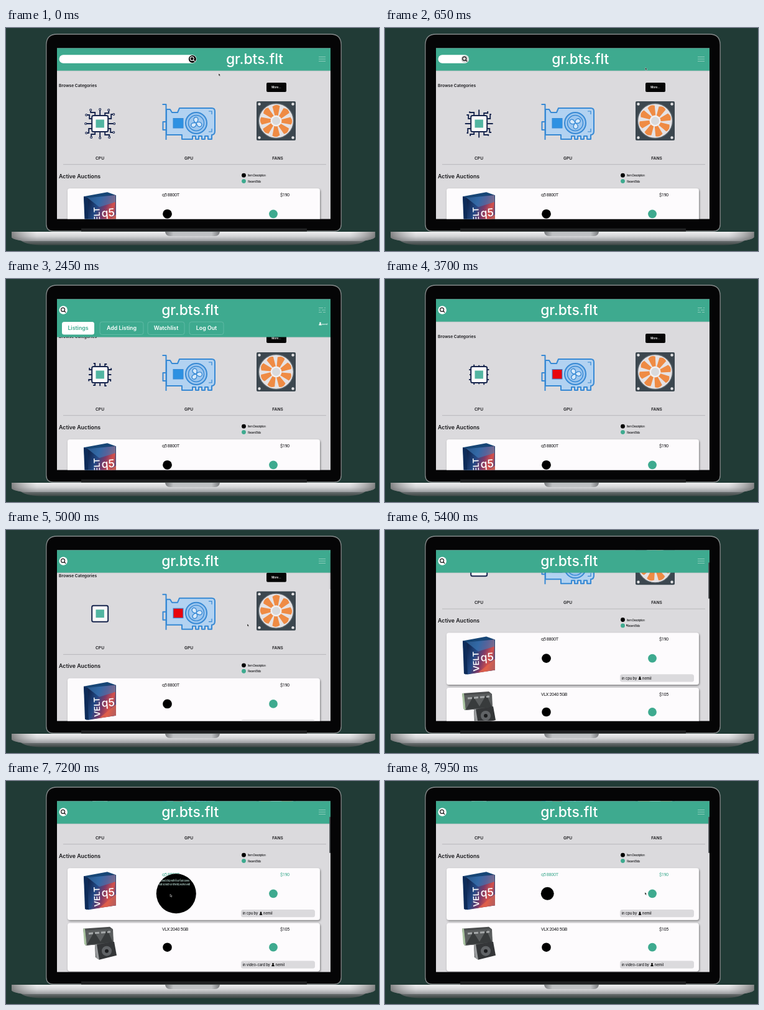
These frames come from a looping animation (600 by 359 pixels, 8 s). An HTML page:

```html
<!DOCTYPE html>
<html lang="en">
<head>
<meta charset="utf-8">
<title>Parts auction on a laptop</title>
<style>
html, body { margin: 0; width: 100%; height: 100%; overflow: hidden; background: #213b36; }
svg { display: block; width: 100%; height: 100%; }
text { font-family: Inter, "Open Sans", sans-serif; font-weight: 600; fill: #17171a; }
.mid { text-anchor: middle; }
.slim text { font-family: Roboto, "Open Sans", sans-serif; font-weight: 400; font-stretch: 75%; letter-spacing: -.45px; }
.leg { fill: none; stroke: #17254d; stroke-width: 1.9; }
.line { fill: none; stroke: #3789d4; stroke-width: 2; stroke-linejoin: round; }
.tab { fill: none; stroke: #6fc2af; stroke-width: .7; }
</style>
</head>
<body>
<svg viewBox="0 0 600 359" preserveAspectRatio="none">
<defs>
  <linearGradient id="metal" x2="0" y2="1">
    <stop offset="0" stop-color="#f0f0f1"/><stop offset=".5" stop-color="#d2d3d5"/><stop offset="1" stop-color="#9a9c9f"/>
  </linearGradient>
  <linearGradient id="under" x2="0" y2="1">
    <stop offset="0" stop-color="#85878a"/><stop offset="1" stop-color="#3c4644"/>
  </linearGradient>
  <linearGradient id="sides">
    <stop offset="0" stop-color="#444" stop-opacity=".6"/><stop offset=".07" stop-color="#888" stop-opacity="0"/>
    <stop offset=".93" stop-color="#888" stop-opacity="0"/><stop offset="1" stop-color="#444" stop-opacity=".6"/>
  </linearGradient>
  <linearGradient id="notch">
    <stop offset="0" stop-color="#77797c"/><stop offset=".15" stop-color="#bfc1c3"/>
    <stop offset=".85" stop-color="#bfc1c3"/><stop offset="1" stop-color="#77797c"/>
  </linearGradient>
  <linearGradient id="boxArt" x1="0" y1=".3" x2="1" y2=".7">
    <stop offset="0" stop-color="#10264f"/><stop offset=".3" stop-color="#234a86"/>
    <stop offset=".55" stop-color="#7d3a68"/><stop offset=".78" stop-color="#d5504a"/><stop offset="1" stop-color="#3b4a92"/>
  </linearGradient>
  <filter id="soft" x="-5%" y="-10%" width="110%" height="125%">
    <feDropShadow dx="1" dy="1.5" stdDeviation="1.5" flood-color="#000" flood-opacity=".45"/>
  </filter>
  <clipPath id="screen"><rect x="82" y="32.6" width="440" height="274.8"/></clipPath>
  <clipPath id="spotClip"><circle id="spotHole" cy="299.3"/></clipPath>
  <g id="legSide">
    <path class="leg" pathLength="1" d="M-8-13v-5h-7v-4"/>
    <path class="leg" pathLength="1" d="M0-13v-11"/>
    <path class="leg" pathLength="1" d="M8-13v-4h6v-5"/>
  </g>
</defs>

<rect width="600" height="359" fill="#213b36"/>
<path d="M64.8 316V27Q65 10 82 10H522Q539 10 539.2 27V316Q539 327 528 327H76Q65 327 64.8 316Z" fill="#050506" stroke="#85898a" stroke-width="1.3"/>
<rect x="121" y="322.5" width="363" height="5" fill="#1f2021"/>

<g clip-path="url(#screen)">
  <rect x="82" y="32" width="440" height="276" fill="#dbdadd"/>
  <g id="page">
    <text x="85" y="95.4" font-size="6.7">Browse Categories</text>
    <rect x="419" y="88" width="32" height="15" rx="2" fill="#050505"/>
    <text class="mid" x="435" y="97.2" font-size="4.5" style="fill:#fff">More...</text>

    <g transform="translate(151.2 154)">
      <g id="legs"></g>
      <rect x="-13" y="-13" width="26" height="26" rx="2.5" fill="#fafafa" stroke="#17254d" stroke-width="2"/>
      <rect x="-6.7" y="-6.5" width="13.4" height="13" fill="#52b5a1"/>
    </g>

    <g>
      <path class="line" d="M251.5 123H257.5V180M257.5 151H252.5V164H257.5"/>
      <path class="line" style="fill:#b2d2f1" d="M258 131H264L267 136H276L279 129H331Q336 129 336 134V166Q336 172 331 172V179H325V174H320V179H315V174H310V179H305V174H300V179H283V172H258Z"/>
      <rect id="core" x="269" y="145.5" width="16" height="15.5" stroke="#3789d4"/>
      <circle class="line" cx="306" cy="153" r="17" style="fill:#9cc6ef"/>
      <circle class="line" cx="306" cy="153" r="12.5" style="stroke-width:1.4"/>
      <g id="prop" fill="#d7e9fa" stroke="#3789d4" stroke-width="1.3"></g>
      <path class="line" style="stroke-width:1.2" d="M326 134h5v5M326 167h5v-5"/>
    </g>

    <g transform="translate(434.5 149.5)">
      <rect x="-31.5" y="-31.5" width="63" height="63" rx="2" fill="#3c474f"/>
      <g id="screws" fill="#e3e3e5"></g>
      <circle r="28" fill="#e5e2e4" stroke="#5b666d" stroke-width="1.3"/>
      <g id="blades" fill="#ef8b44"></g>
      <circle r="9" fill="#f2f0f1"/><circle r="6.5" fill="#d9dadd"/>
    </g>

    <g class="mid" font-size="6.6">
      <text x="151" y="211.5">CPU</text><text x="294" y="211.5">GPU</text><text x="437" y="211.5">FANS</text>
    </g>
    <path d="M92 219.7H515" stroke="#b0afb3" stroke-width=".8"/>
    <text x="85" y="241.7" font-size="8.8">Active Auctions</text>
    <circle cx="382.5" cy="237.2" r="3.4"/><circle cx="382.5" cy="246.6" r="3.4" fill="#3eaa8f"/>
    <g class="slim" font-size="4.9"><text x="389" y="239.2">Item Description</text><text x="389" y="248.6">Recent Bids</text></g>

    <g id="cards"></g>

    <g transform="translate(0 258.2)">
      <path d="M125 13 163 6 177 11 177 60 129 67Z" fill="#174676"/>
      <path d="M125 13 131 15 133 67 127 66Z" fill="#0d2b59"/>
      <path d="M131 15 176 11 177 60 133 67Z" fill="url(#boxArt)"/>
      <path d="M131 15 176 11 176 22 150 30Z" fill="#3f7fbd" opacity=".6"/>
      <path d="M150 64 177 42V60Z" fill="#e5654a" opacity=".75"/>
      <text transform="translate(151.5 62) rotate(-92)" font-size="13" style="fill:#fff">VELT</text>
      <text transform="translate(154 46) rotate(-4)" font-size="17.5" style="fill:#fff;font-weight:500">q5</text>
    </g>
    <g transform="translate(0 346.7)">
      <path d="M124 9 167 6 172 10 173 32 128 36Z" fill="#4a4c4d"/>
      <path d="M124 9 127 9 130 36 126 34Z" fill="#a9c3a0"/>
      <path d="M128 12 171 9 173 32 130 36Z" fill="#5a5d5e"/>
      <path d="M130 35 142 14 152 30 163 11 172 31Z" fill="#383b3c"/>
      <path d="M133 17 168 14" stroke="#a5a8a9" stroke-width="3" stroke-dasharray="7 3"/>
      <path d="M143 35 174 30 178 52 150 59 144 55Z" fill="#343638"/>
      <path d="M143 35 146 34 150 59 145 56Z" fill="#9b9d9f"/>
      <circle cx="162" cy="45" r="8" fill="#606366"/><circle cx="162" cy="45" r="3" fill="#1b1c1e"/>
    </g>

    <circle id="spot" cy="299.3"/>
    <g id="note" class="slim" clip-path="url(#spotClip)" font-size="4.5">
      <text x="242" y="280" style="fill:#b9d9d1">Unlocked chip with four fast cores</text>
      <text x="242" y="286" style="fill:#b9d9d1">Small scratch on the lid, works well</text>
    </g>
  </g>

  <rect id="shade" x="82" y="32" width="440" fill="#000" opacity=".07"/>
  <rect id="head" x="82" y="32" width="440" fill="#3eaa8f"/>
  <g id="menu" font-size="8.8" class="mid"></g>
  <rect id="bar" x="85.5" y="43.3" height="13.4" rx="6.7" fill="#fff"/>
  <g id="lens">
    <circle id="disc" r="6"/>
    <g id="glass" fill="none" stroke-width="1.1"><circle cx="-.6" cy="-.6" r="3"/><path d="M1.6 1.6 4 4"/></g>
  </g>
  <text id="title" class="mid" y="58" font-size="22.9" style="fill:#fff;font-weight:500">gr.bts.flt</text>
  <g id="icon" stroke="#9fd3c5" stroke-width=".8"></g>
  <rect id="thumb" x="520.2" width="1.8" height="58" fill="#45484b"/>
  <path id="cursor" d="M0 0V4.2L1.1 3.3 1.9 5 2.7 4.6 1.9 3 3.2 2.9Z" fill="#151515" stroke="#fff" stroke-width=".4"/>
</g>

<path d="M20 339H582Q572 349.5 545 349.5H57Q30 349.5 20 339Z" fill="url(#under)"/>
<path id="base" d="M9 328H593.5V337Q590 341 572 343H30Q12 341 9 337Z" fill="url(#metal)"/>
<path d="M9 328H593.5V337Q590 341 572 343H30Q12 341 9 337Z" fill="url(#sides)"/>
<path d="M256 328H344Q343 335 336 335H264Q257 335 256 328Z" fill="url(#notch)"/>
</svg>

<script>
const LOOP = 8000;
const $ = id => document.getElementById(id);
const set = (id, attrs) => { for (const k in attrs) $(id).setAttribute(k, attrs[k]); };
const clamp = v => Math.max(0, Math.min(1, v));
const mix = (a, b, u) => a + (b - a) * u;
const ease = (t, from, span) => { const u = clamp((t - from) / span); return u * u * (3 - 2 * u); };
const repeat = (n, fn) => Array.from({ length: n }, (_, i) => fn(i)).join('');
const person = (x, y) => `<circle cx="${x}" cy="${y - 3.3}" r="1.3"/><path d="M${x - 2.2} ${y + .6}q0-2.8 2.2-2.8t2.2 2.8z"/>`;

$('legs').innerHTML = repeat(4, i => `<use href="#legSide" transform="rotate(${i * 90})"/>`) +
  `<g id="tips" fill="#dbdadd" stroke="#17254d" stroke-width="1.1">` +
  repeat(4, i => `<g transform="rotate(${i * 90})"><circle cx="-15" cy="-22" r="1.5"/><circle cy="-23" r="1.5"/><circle cx="14" cy="-22" r="1.5"/></g>`) + '</g>';
$('prop').innerHTML = repeat(3, i => `<path d="M0 0C-6-3-5-9 0-9.5 4-8 4-4 0 0Z" transform="rotate(${i * 120})"/>`);
$('blades').innerHTML = repeat(8, i => `<path d="M-2-8-6-23Q0-28 6-24L3-8Z" transform="rotate(${i * 45})"/>`);
$('screws').innerHTML = repeat(4, i => `<circle cx="-27" cy="-27" r="2.2" transform="rotate(${i * 90})"/>`);
$('icon').innerHTML = repeat(3, i => `<path d="M503 ${46.5 + i * 3.5}h11"/>`);

function card({ y, height, name, price, kind, dotY, whoX, hot }) {
  const foot = height - 16.8;
  const tone = hot ? ' class="hot"' : '';
  return `<g transform="translate(0 ${y})">
    <rect x="99" width="406" height="${height}" rx="4" fill="#fdfbfd" filter="url(#soft)"/>
    <g class="slim" font-size="7.4"><text${tone} x="251" y="12.7">${name}</text><text${tone} x="441" y="12.7">${price}</text></g>
    ${hot ? '' : `<circle cx="259.5" cy="${dotY}" r="7.3"/>`}
    <circle cx="430" cy="${dotY}" r="6.9" fill="#3eaa8f"/>
    <rect x="378" y="${foot}" width="119" height="12.3" rx="3.5" fill="#dbdadd"/>
    <g font-size="5.7" transform="translate(0 ${foot + 8.3})">
      <text x="380.5" style="font-weight:500">in ${kind} by</text>
      ${person(whoX, 0)}<text x="${whoX + 4}" style="font-weight:500">nemil</text>
    </g>
  </g>`;
}
$('cards').innerHTML =
  card({ y: 258.2, height: 83.5, name: 'q5 8800T', price: '$190', kind: 'cpu', dotY: 41.1, whoX: 410, hot: true }) +
  card({ y: 346.7, height: 77.5, name: 'VLX 2040 5GB', price: '$105', kind: 'video-card', dotY: 39, whoX: 429.5, hot: false });
const hotText = document.querySelectorAll('.hot');
const legPaths = document.querySelectorAll('#legSide path');
const iconLines = document.querySelectorAll('#icon path');

const tabs = [['Listings', 90, 52], ['Add Listing', 151, 70], ['Watchlist', 228, 59], ['Log Out', 295, 55]];
$('menu').innerHTML = tabs.map(([label, x, w], i) =>
  `<rect class="${i ? 'tab' : ''}" x="${x}" y="69" width="${w}" height="20.5" rx="3.5" fill="#fff"/>
   <text x="${x + w / 2}" y="82.3" style="fill:${i ? '#fff' : '#3eaa8f'}">${label}</text>`).join('') +
  `<g fill="#fff">${person(505.5, 74)}</g><text x="512.8" y="74" font-size="3.6" style="fill:#fff">nemil</text>`;

// time, x, y
const trail = [[0, 342, 73], [250, 345, 75], [1100, 506, 50], [3750, 507, 51], [4600, 388, 151],
  [5850, 388, 151], [6150, 264, 182], [7350, 264, 182], [7850, 418, 179], [8000, 418, 179]];
function pointer(t) {
  const i = Math.max(1, trail.findIndex(k => k[0] > t));
  const [a, b] = [trail[i - 1], trail[i]];
  const u = ease(t, a[0], b[0] - a[0]);
  return [mix(a[1], b[1], u), mix(a[2], b[2], u)];
}

function draw(t) {
  const open = 1 - ease(t, 100, 750);
  const width = mix(13.4, 221, open);
  set('bar', { width });
  set('lens', { transform: `translate(${85.5 + width - 6.7} 50)` });
  set('disc', { opacity: open });
  set('glass', { stroke: open > .5 ? '#fff' : '#111' });
  set('title', { x: 296.2 + (width - 13.4) / 2 });

  const menu = ease(t, 1850, 400) - ease(t, 3000, 400);
  const tall = mix(36.7, 61.5, menu);
  set('head', { height: tall });
  set('shade', { height: tall + 1 });
  set('menu', { opacity: clamp(menu * 2 - 1), transform: `translate(0 ${(menu - 1) * 24})` });
  const over = ease(t, 950, 250) - ease(t, 3850, 300);
  iconLines.forEach((line, i) => {
    const gap = 2 * over, lead = mix(11, [7, 3, 5][i], over);
    line.setAttribute('stroke-dasharray', `${lead} ${gap} 11`);
  });

  const scroll = 118 * ease(t, 4770, 900);
  set('page', { transform: `translate(0 ${-scroll})` });
  set('thumb', { y: 33 + scroll * .21, opacity: ease(t, 4950, 200) });

  const leg = clamp(1 - t / 4600);
  legPaths.forEach(p => p.setAttribute('stroke-dasharray', `${leg} 2`));
  set('legs', { visibility: leg ? 'visible' : 'hidden' });
  set('tips', { opacity: 1 - ease(t, 100, 500) });
  const red = ease(t, 2900, 400);
  set('core', { fill: `rgb(${mix(45, 232, red)} ${mix(145, 5, red)} ${mix(226, 12, red)})` });
  set('prop', { transform: `translate(306 153) rotate(${t * .09})` });
  set('blades', { transform: `rotate(${t * .045})` });

  const grow = ease(t, 6050, 347) - ease(t, 7600, 450);
  const r = mix(7.4, 32, grow), cx = 259.5 + (r - 7.4) * .58;
  set('spot', { r, cx });
  set('spotHole', { r, cx });
  set('note', { opacity: clamp(grow * 3 - 1) });
  const hot = ease(t, 5800, 250);
  const tint = `rgb(${mix(23, 62, hot)} ${mix(23, 170, hot)} ${mix(26, 143, hot)})`;
  hotText.forEach(el => { el.style.fill = tint; });

  const [x, y] = pointer(t);
  set('cursor', { transform: `translate(${x} ${y})`, opacity: 1 - over });
}

const start = performance.now();
function tick(now) {
  draw(Math.max(0, now - start) % LOOP);
  requestAnimationFrame(tick);
}
draw(0);
requestAnimationFrame(tick);
</script>
</body>
</html>
```
